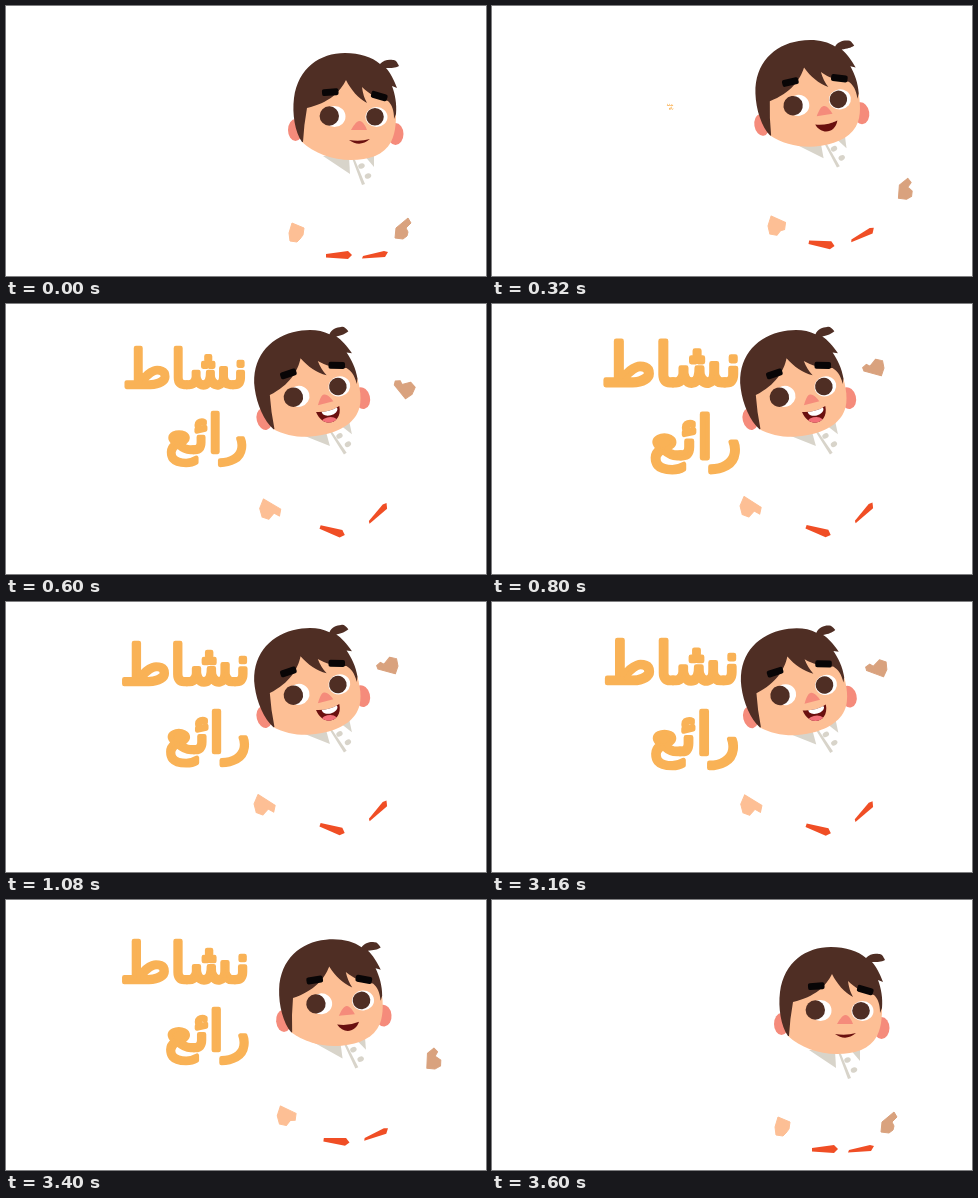
An HTML page for the animation above (4040 ms loop, 480 by 270 pixels).

```html
<!DOCTYPE html>
<html lang="ar">
<head>
<meta charset="utf-8">
<style>
html, body { margin: 0; width: 100%; height: 100%; overflow: hidden; background: #fff; }
svg { display: block; width: 100vw; height: 100vh; }
text { font: 54px "DejaVu Sans", sans-serif; fill: #f9b256; stroke: #f9b256; stroke-width: 4.5; stroke-linejoin: round; }
</style>
</head>
<body>
<svg viewBox="0 0 480 270">
  <defs><clipPath id="lips"><path id="lipShape"/></clipPath></defs>

  <g id="title" direction="rtl">
    <text x="244" y="82">نشاط</text>
    <text x="244" y="150">رائع</text>
  </g>

  <g fill="#f04e25">
    <path id="footL" d="M320 248L342 245L346 249L342 253L320 251.500Z"/>
    <path id="footR" d="M357 250L378 245L382 246L379 251L356 252.500Z"/>
  </g>
  <g stroke-linejoin="round">
    <path id="handL" fill="#fdbf95" stroke="#fdbf95"/>
    <path id="handR" fill="#d9a27e" stroke="#d9a27e"/>
  </g>

  <g id="collar" fill="#d8d4ca">
    <path d="M317 150L344 168L343 150Z"/>
    <path d="M357 148L368 161L368 146Z"/>
    <path d="M346 152L349 154L359 178L356 179Z"/>
    <ellipse cx="355.500" cy="160" rx="3.300" ry="2.600" transform="rotate(-20 355.5 160)"/>
    <ellipse cx="362" cy="170" rx="3.300" ry="2.600" transform="rotate(-20 362 170)"/>
  </g>

  <g id="head">
    <g fill="#f58b7b">
      <ellipse cx="289.500" cy="124" rx="7.500" ry="11"/>
      <ellipse cx="389.500" cy="128" rx="8" ry="11"/>
    </g>
    <path fill="#fdbf95" d="M294 95Q300 66 340 64Q382 66 389 96C391 112 390 126 385 136C378 149 363 154 345 154C326 154 308 147 296 136Z"/>
    <path fill="#4f2e24" d="M296 136C289 126 286 108 288 92C292 62 314 47 339 47C354 47 366 51 374 58C377 54 383 53 387 54C390 54 391 56 393 60C389 62 386 62 380 62C384 66 388 74 391 82L386 80C389 88 391 98 390 108L388 113C388 104 386 99 382 95C372 93 363 88 356 81Q357 90 361 97C352 92 345 84 340 74C334 86 323 97 301 102Q298 118 297 136Z"/>
    <g fill="#fff">
      <ellipse cx="328.500" cy="110.500" rx="11" ry="10.500"/>
      <ellipse cx="370.500" cy="111" rx="11" ry="10"/>
    </g>
    <g fill="#4f2e24">
      <circle cx="323.300" cy="110" r="9.700"/>
      <circle cx="369" cy="110.800" r="8.800"/>
    </g>
    <g fill="#080506">
      <rect x="316" y="82.700" width="16.500" height="7" rx="2" transform="rotate(-4 324 86)"/>
      <rect x="365" y="86.500" width="16.500" height="7" rx="2" transform="rotate(16 373 90)"/>
    </g>
    <path fill="#f58b7b" d="M345 124C347 121 350 115 353.500 115C357 115 360 121 361 124Z"/>
    <path id="mouth" fill="#6a100f"/>
    <g clip-path="url(#lips)">
      <ellipse id="tongue" cx="351" cy="144" rx="9" fill="#f27078"/>
      <ellipse id="teeth" cx="355" cy="132" rx="8" fill="#fff"/>
    </g>
  </g>
</svg>
<script>
const LOOP = 4040, HALF = 2000;
const el = id => document.getElementById(id);
const part = (t, a, b) => Math.min(1, Math.max(0, (t - a) / (b - a)));
const ease = u => (1 - Math.cos(Math.PI * u)) / 2;

// 0 = standing, 1 = jumping; the way back is shared by all parts.
const lean = (t, a, b) =>
  t < HALF ? ease(part(t, a, b)) : 1 - ease(part(t, 3120, 3600));

// Shift and turn a part around its pivot by the amount p.
function pose(id, p, dx, dy, turn, cx, cy) {
  el(id).setAttribute("transform",
    `translate(${dx * p} ${dy * p}) rotate(${turn * p} ${cx} ${cy})`);
}

const bezier = (a, c, b, u) =>
  a * (1 - u) ** 2 + 2 * c * u * (1 - u) + b * u * u;

// Hand on an arc; "shape" is drawn around its centre.
function hand(id, u, from, bend, to, turn, shape) {
  const [x, y] = from.map((v, i) => bezier(v, bend[i], to[i], u));
  el(id).setAttribute("d", shape);
  el(id).setAttribute("transform", `translate(${x} ${y}) rotate(${turn})`);
}

// r = how relaxed the fingers are
const leftShape = r =>
  `M${4 * r - 8} -9L${11 - 3 * r} ${-2 - 2 * r}L${11 - 4 * r} ${5 - 2 * r}` +
  `L${5 - r} ${3 + 4 * r}L1 10L-6 9L${3 * r - 10} 1Z`;
const rightShape = r =>
  `M-7 9L-6 ${8 * r - 9}L${9 * r - 3} -11L${1 + 8 * r} ${2 * r - 8}` +
  `L${4 * r} ${3 * r - 4}L${8 - 2 * r} ${3 * r}L${8 - 3 * r} 7L1 10Z`;

const mouthShape = m =>
  `M${343 - 1.5 * m} ${134 - 4 * m}Q354 ${136 - 2 * m} ${364 + 1.5 * m} ${133 - 3 * m}` +
  `C${357 + 8 * m} ${139 + 9 * m} ${350 - 6 * m} ${139 + 10 * m} ${343 - 1.5 * m} ${134 - 4 * m}Z`;

function titleScale(t) {
  if (t < 700) return 1.09 * ease(part(t, 260, 700));
  if (t < HALF) return 1.09 - 0.09 * ease(part(t, 700, 1080));
  if (t < 3240) return 1 + 0.095 * Math.sin(Math.PI / 2 * part(t, 3120, 3240));
  return 1.095 * (1 - part(t, 3240, 3600) ** 3);
}

function draw(t) {
  const s = titleScale(t);
  el("title").setAttribute("visibility", s > 0.01 ? "visible" : "hidden");
  el("title").setAttribute("transform", `translate(178 101) scale(${s}) translate(-178 -101)`);

  const body = lean(t, 0, 560), legs = lean(t, 0, 640), arms = lean(t, 120, 760);
  pose("head", body, -36.5, -22.5, -14.5, 346, 110.5);
  pose("collar", body, -22, -28, -12, 355, 160);
  pose("footL", legs, -6.5, -22.5, 20, 333, 249);
  pose("footR", legs, 2.5, -40.5, -37, 369.5, 248.5);

  const relaxed = (1 - arms) ** 2;
  hand("handL", arms, [290, 226], [278, 210], [258, 203], 12 * arms, leftShape(relaxed));
  hand("handR", arms, [396, 223], [t < HALF ? 448 : 468, 132], [382, 63],
    -78 * arms ** 4, rightShape(relaxed));

  const lips = mouthShape(legs);
  el("mouth").setAttribute("d", lips);
  el("lipShape").setAttribute("d", lips);
  el("tongue").setAttribute("ry", 6 * legs);
  el("teeth").setAttribute("ry", 5 * legs ** 4);
}

function tick() {
  draw(performance.now() % LOOP);
  requestAnimationFrame(tick);
}
tick();
</script>
</body>
</html>
```
